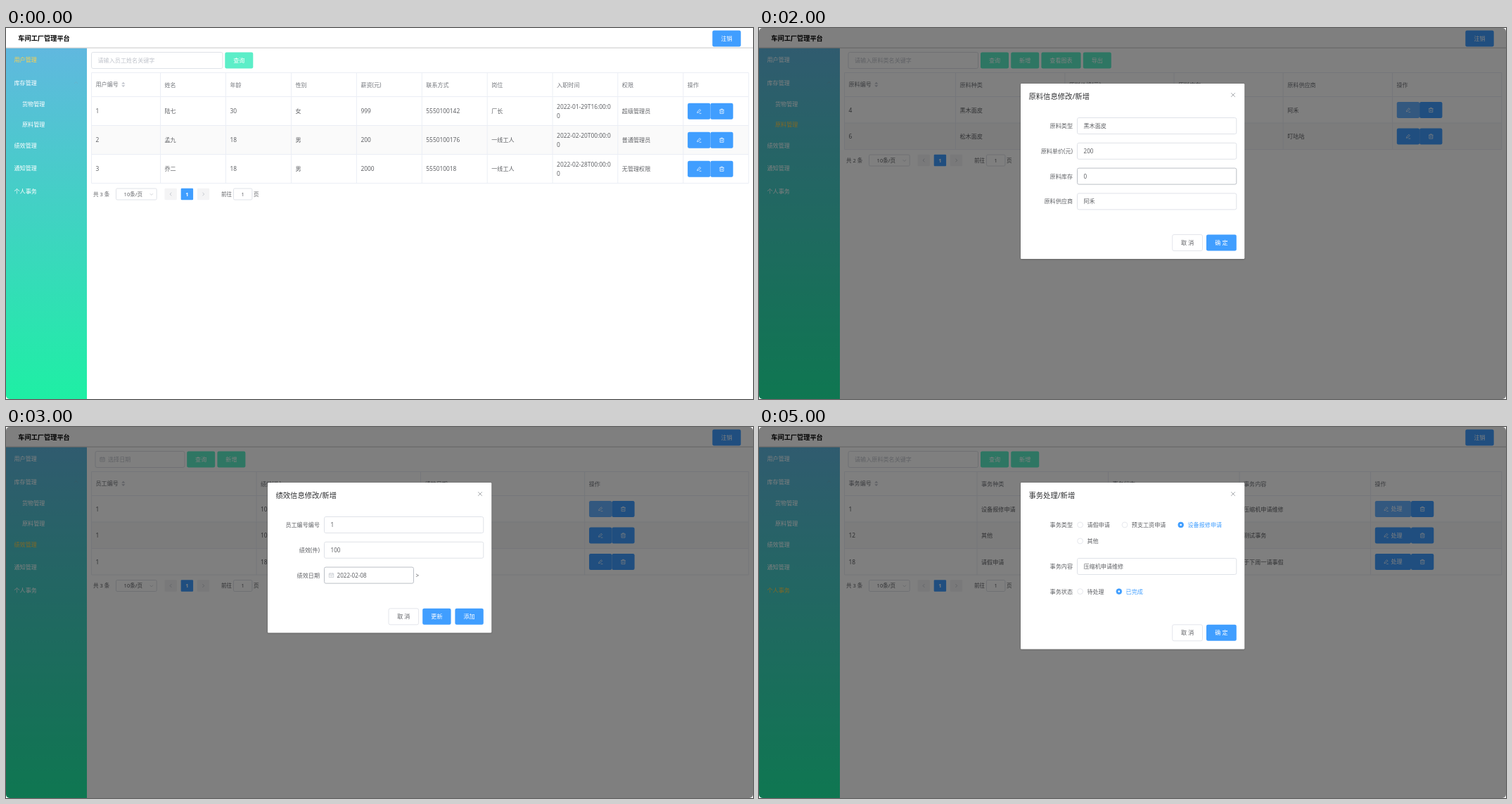
An HTML page that plays this animation: 1062x527 px, repeating every 6000 ms.

```html
<!DOCTYPE html>
<html>
<head>
<meta charset="utf-8">
<title>车间工厂管理平台</title>
<style>
html, body { margin: 0; width: 100%; height: 100%; overflow: hidden; background: #fff; }
svg { display: block; width: 1062px; height: 527px; }
text { font-family: "Noto Sans", "Noto Sans CJK SC", sans-serif; white-space: pre; }
.scene { visibility: hidden; animation: show 6s step-end infinite; }
@keyframes show {
  0% { visibility: visible; }
  16.6667%, 100% { visibility: hidden; }
}
</style>
</head>
<body>
<svg id="stage" viewBox="0 0 1062 527" xmlns="http://www.w3.org/2000/svg">
  <defs>
    <linearGradient id="side" x1="0" y1="0" x2="0" y2="1">
      <stop offset="0" stop-color="#60b8df"/>
      <stop offset="1" stop-color="#1eefa4"/>
    </linearGradient>
    <clipPath id="round"><rect width="1062" height="527" rx="5"/></clipPath>
    <filter id="shadow" x="-5%" y="-5%" width="110%" height="110%">
      <feDropShadow dx="0" dy=".6" stdDeviation=".9" flood-opacity=".3"/>
    </filter>
    <g id="pen" fill="none" stroke="#fff" stroke-width=".7" stroke-linejoin="round">
      <path d="M-2.6 2.2 L-2.2 .4 L1 -2.8 L2.4 -1.4 L-.8 1.8 Z M.4 3 H3.2"/>
    </g>
    <g id="bin" fill="none" stroke="#fff" stroke-width=".7">
      <path d="M-3.3 -2 H3.3 M-1.2 -2 V-3.2 H1.2 V-2 M-2.5 -2 V3.1 H2.5 V-2 M-.8 -.4 V1.6 M.8 -.4 V1.6"/>
    </g>
    <g id="cal" fill="none" stroke="#c0c4cc" stroke-width=".7">
      <path d="M-3.2 -2.6 H3.2 V3 H-3.2 Z M-3.2 -.8 H3.2 M-1.6 -3.4 V-1.9 M1.6 -3.4 V-1.9 M-1.8 1 H1.8"/>
    </g>
  </defs>
</svg>
<script>
const BLUE = '#409eff', HOVER = '#66b1ff', MINT = '#5ceec8';
const INK = '#606266', HEAD = '#75787e', HINT = '#c0c4cc', EDGE = '#dcdfe6', LINE = '#ebeef5';
const MENU = [['用户管理', 45], ['库存管理', 78], ['货物管理', 108], ['原料管理', 137],
  ['绩效管理', 167.5], ['通知管理', 199.5], ['个人事务', 232]];

const rect = (x, y, w, h, fill, more = '') =>
  `<rect x="${x}" y="${y}" width="${w}" height="${h}" fill="${fill}" ${more}/>`;
const line = (d, color, w = 1) => `<path d="${d}" fill="none" stroke="${color}" stroke-width="${w}"/>`;
const icon = (id, x, y) => `<use href="#${id}" x="${x}" y="${y}"/>`;

// Text centred vertically on y
function text(s, x, y, { size = 8.1, fill = INK, anchor = 'start', weight = 400 } = {}) {
  return `<text x="${x}" y="${(y + size * .36).toFixed(2)}" font-size="${size}" fill="${fill}"` +
    ` text-anchor="${anchor}" font-weight="${weight}">${s.replace('>', '&gt;')}</text>`;
}

function button(x, y, w, label, fill = BLUE) {
  const plain = fill === '#fff';
  return rect(x, y, w, 23, fill, `rx="2.3" ${plain ? `stroke="${EDGE}" stroke-width=".8"` : ''}`) +
    (label ? text(label, x + w / 2, y + 11.5, { anchor: 'middle', weight: 500, fill: plain ? INK : '#fff' }) : '');
}

function field(x, y, w, value, { hint = false, date = false, edge = EDGE } = {}) {
  return rect(x, y, w, 23, '#fff', `rx="2.3" stroke="${edge}" stroke-width=".9"`) +
    (date ? icon('cal', x + 10, y + 11.5) : '') +
    text(value, x + (date ? 18 : 9), y + 11.5, { fill: hint ? HINT : INK });
}

function frame(active, hover) {
  let out = rect(0, 0, 1062, 527, '#fff') + rect(0, 28.5, 115, 498.5, 'url(#side)') +
    line('M0 28.2 H1062', '#c8c8c8') +
    text('车间工厂管理平台', 17.3, 14.5, { size: 9.2, fill: '#000', weight: 700 }) +
    button(1004.3, 3.5, 40.4, '注销') +
    `<g opacity=".3">${line('M97 79 l2.5 -2.5 l2.5 2.5', '#909399', .7)}</g>`;
  if (hover) out += rect(0, 93.5, 115, 28.7, '#ccc');
  MENU.forEach(([s, y], i) => {
    out += text(s, i === 2 || i === 3 ? 23 : 11.5, y, { fill: i === active ? '#ffd04b' : '#fff' });
  });
  return out;
}

// Edit and delete buttons of one row
function actions(kind, x, y, first) {
  const top = y - 11.5, fill = first ? HOVER : BLUE;
  if (kind === 'bin') return button(x, top, 32.3) + icon('bin', x + 16.2, y);
  const wide = kind === 'handle', w = wide ? 51.2 : 32.3;
  return button(x, top, w, '', fill) + icon('pen', x + (wide ? 15.8 : 16.2), y) +
    (wide ? text('处理', x + 22.7, y, { fill: '#fff', weight: 500 }) : '') +
    button(x + w, top, 32.3) + icon('bin', x + w + 16.2, y);
}

function table({ cols, heads, rows, rowH = 37.5, ops = 'pen', lit }) {
  const left = 121.5, right = 1055.8, top = 63.5, body = 97.5;
  const end = body + rows.length * rowH, starts = [left, ...cols];
  let out = '';
  rows.forEach((_, i) => {
    if (i % 2) out += rect(left, body + i * rowH, right - left, rowH, '#fafafa');
  });
  out += line(`M${left} ${top} H${right} V${end} H${left} Z` +
    rows.map((_, i) => `M${left} ${body + i * rowH} H${right}`).join('') +
    cols.map(x => `M${x} ${top} V${end}`).join(''), LINE);
  [...heads, '操作'].forEach((s, i) => {
    out += text(s, starts[i] + 6, i ? 81.5 : 80.3, { fill: HEAD, weight: 500 });
  });
  out += `<path d="M164.2 79.5 l2.6 -2.7 l2.6 2.7 Z M164.2 81.2 l2.6 2.7 l2.6 -2.7 Z" fill="${HINT}"/>`;
  rows.forEach((row, r) => {
    const y = body + (r + .5) * rowH + .4;
    row.forEach((cell, c) => {
      const lines = cell.split('\n');
      const size = /^[\x00-\x7f]+$/.test(cell) ? 8.4 : 8.1;
      lines.forEach((s, k) => {
        out += text(s, starts[c] + 6, y + (k - (lines.length - 1) / 2) * 13.2, { size });
      });
    });
    out += actions(ops, starts[row.length] + 6.3, y - .1, lit && r === 0);
  });
  return out + pager(rows.length, end + 15.5);
}

function pager(count, y) {
  const small = { size: 7.5 }, mid = { size: 7.5, anchor: 'middle' };
  const box = (x, w) => rect(x, y - 8, w, 16, '#fff', `rx="1.7" stroke="${EDGE}" stroke-width=".9"`);
  const tile = (x, fill) => rect(x, y - 8.2, 17.4, 16.4, fill, 'rx="1.2"');
  return text(`共 ${count} 条`, 124, y, small) +
    box(156.5, 57.7) + text('10条/页', 180.8, y, mid) +
    line(`M204.6 ${y - .8} l2.2 2.2 l2.2 -2.2`, HINT, .7) +
    tile(225.5, '#f4f4f5') + line(`M235.3 ${y - 2.3} l-2.2 2.3 l2.2 2.3`, HINT, .9) +
    tile(248.7, BLUE) + text('1', 257.4, y, { ...mid, fill: '#fff', weight: 700 }) +
    tile(271.8, '#f4f4f5') + line(`M279.5 ${y - 2.3} l2.2 2.3 l-2.2 2.3`, HINT, .9) +
    text('前往', 306, y, small) + box(323.5, 26.4) + text('1', 336.7, y, mid) + text('页', 352, y, small);
}

function dialog(title, bottom, content) {
  return rect(0, 0, 1062, 527, '#000', 'opacity=".5"') +
    rect(372, 79, 318.2, bottom - 79, '#fff', 'rx="1.2" filter="url(#shadow)"') +
    text(title, 383.4, 97.5, { size: 10.35, fill: '#303133' }) +
    line('M671.2 92.3 l5.6 5.6 m0 -5.6 l-5.6 5.6', '#909399', .8) + content;
}

const label = (s, y) => text(s, 446, y, { anchor: 'end' });
const row = (s, y, value, opts) => label(s, y) + field(452.5, y - 11.5, opts && opts.date ? 127 : 226.3, value, opts);
const confirm = y => button(587.7, y, 42.8, '取 消', '#fff') + button(636, y, 42.8, '确 定');

function radio(s, x, y, on) {
  return `<circle cx="${x}" cy="${y}" r="3.9" fill="${on ? BLUE : '#fff'}" stroke="${on ? BLUE : EDGE}" stroke-width=".7"/>` +
    (on ? `<circle cx="${x}" cy="${y}" r="1.3" fill="#fff"/>` : '') +
    text(s, x + 9.8, y, { fill: on ? BLUE : INK });
}

const search = (s, ...labels) => {
  const xs = [315, 358.2, 401.4, 460.8];
  return field(127, 34.5, 184.5, s, { hint: true }) +
    labels.map((t, i) => button(xs[i], 34.5, t.length > 2 ? 56.2 : 40, t, MINT)).join('');
};

const FOUR = [310, 496.5, 683, 869.5];
const FIVE = [279.5, 434.8, 590, 745.2, 900.5];

const scenes = [
  frame(0) +
  field(121.5, 34.5, 186.5, '请输入员工姓名关键字', { hint: true }) + button(311.3, 34.5, 40, '查询', MINT) +
  table({
    cols: [219.5, 312.5, 405.5, 498.4, 591.3, 684.2, 777.1, 869.8, 962.8],
    heads: ['用户编号', '姓名', '年龄', '性别', '薪资(元)', '联系方式', '岗位', '入职时间', '权限'],
    rowH: 41,
    rows: [
      ['1', '陆七', '30', '女', '999', '5550100142', '厂长', '2022-01-29T16:00:0\n0', '超级管理员'],
      ['2', '孟九', '18', '男', '200', '5550100176', '一线工人', '2022-02-20T00:00:0\n0', '普通管理员'],
      ['3', '乔二', '18', '男', '2000', '555010018', '一线工人', '2022-02-28T00:00:0\n0', '无管理权限']
    ]
  }),

  frame(2, true) + search('请输入产品类名关键字', '查询', '新增', '查看图表', '导出') +
  table({
    cols: FOUR,
    heads: ['货物编号', '货物种类', '货物价格(元)', '货物库存'],
    rows: [
      ['4', 'kep', '1000', '1211'],
      ['8', 'baiheyun', '1', '200'],
      ['15', '123', '123', '123'],
      ['17', '咚嗒哩咚', '123', '100']
    ]
  }),

  frame(3) + search('请输入原料类名关键字', '查询', '新增', '查看图表', '导出') +
  table({
    cols: FIVE, lit: true,
    heads: ['原料编号', '原料种类', '原料价格(元)', '原料库存', '原料供应商'],
    rows: [['4', '黑木面皮', '200', '0', '阿禾'], ['6', '松木面皮', '200', '0', '叮咕咕']]
  }) +
  dialog('原料信息修改/新增', 328,
    row('原料类型', 139, '黑木面皮') + row('原料单价(元)', 174.8, '200') +
    row('原料库存', 210.6, '0', { edge: '#b4b8c0' }) + row('原料供应商', 246.4, '阿禾') + confirm(293.5)),

  frame(4) +
  field(127, 34.5, 127, '选择日期', { hint: true, date: true }) +
  button(257.2, 34.5, 40, '查询', MINT) + button(300.4, 34.5, 40, '新增', MINT) +
  table({
    cols: [356, 589.5, 822.7], lit: true,
    heads: ['员工编号', '绩效(件)', '绩效日期'],
    rows: [['1', '100', '2022-02-08'], ['1', '100', '2022-02-08'], ['1', '180', '2022-02-08']]
  }) +
  dialog('绩效信息修改/新增', 292.3,
    row('员工编号编号', 139, '1') + row('绩效(件)', 174.8, '100') +
    row('绩效日期', 210.6, '2022-02-08', { date: true, edge: '#b4b8c0' }) + text('>', 582.6, 210.6) +
    button(544, 257.8, 42.6, '取 消', '#fff') + button(592.2, 257.8, 40.4, '更新') + button(638.4, 257.8, 40.4, '添加')),

  frame(5) + button(130, 34.5, 56.2, '发送消息', MINT) +
  table({
    cols: FIVE, ops: 'bin',
    heads: ['消息编号', '发送者编号', '接收者编号', '消息类型', '消息内容'],
    rows: [
      ['12', '2', '1', '详细生产安排', '详细生产安排1'],
      ['16', '3', '1', '个人事务', '个人事务1'],
      ['18', '2', '1', '私信', '私信1']
    ]
  }),

  frame(6) + search('请输入原料类名关键字', '查询', '新增') +
  table({
    cols: FOUR, ops: 'handle', lit: true,
    heads: ['事务编号', '事务种类', '事务状态', '事务内容'],
    rows: [
      ['1', '设备报修申请', '已完成', '压缩机申请维修'],
      ['12', '其他', '待处理', '测试事务'],
      ['18', '请假申请', '待处理', '于下周一请事假']
    ]
  }) +
  dialog('事务处理/新增', 315.5,
    label('事务类型', 139) + radio('请假申请', 456.6, 139) + radio('预支工资申请', 520, 139) +
    radio('设备报修申请', 599.7, 139, true) + radio('其他', 456.6, 162) +
    row('事务内容', 198, '压缩机申请维修') +
    label('事务状态', 233.6) + radio('待处理', 456.6, 233.6) + radio('已完成', 511.8, 233.6, true) + confirm(280.8))
];

document.getElementById('stage').insertAdjacentHTML('beforeend',
  `<g clip-path="url(#round)">${scenes.map((s, i) =>
    `<g class="scene" style="animation-delay:${i ? i - 6 : 0}s">${s}</g>`).join('')}</g>`);
</script>
</body>
</html>
```
